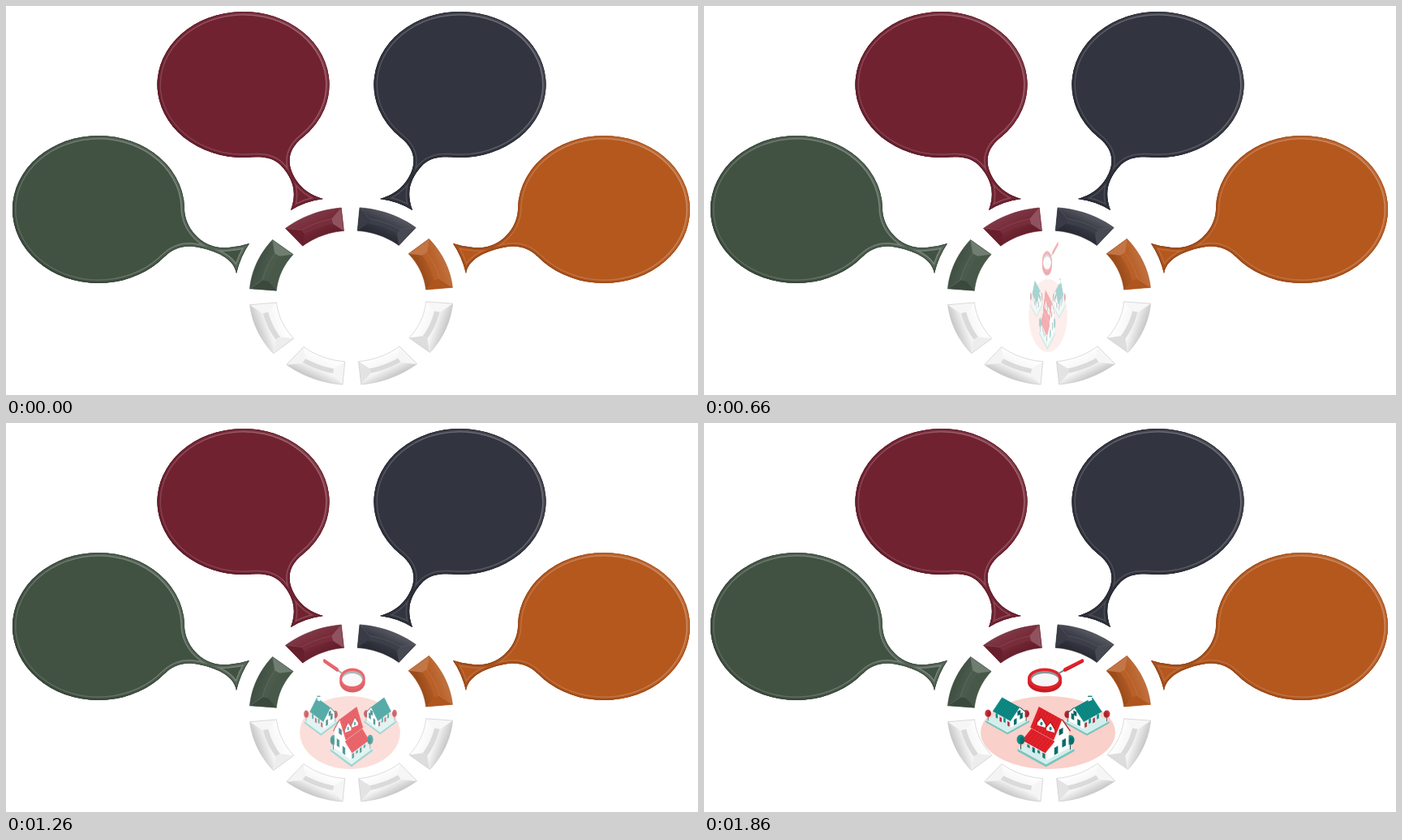
An HTML page with a canvas that plays this animation: 853x480 px, repeating every 8000 ms.

```html
<!DOCTYPE html>
<html lang="en">
<head>
<meta charset="utf-8">
<title>Bubbles and houses</title>
<style>
html, body { margin: 0; width: 100%; height: 100%; overflow: hidden; background: #fff; }
canvas { display: block; width: 853px; height: 480px; }
</style>
</head>
<body>
<canvas id="stage" width="853" height="480"></canvas>
<script>
const W = 853, H = 480, LOOP = 8000, STEP = 60, SPIN = 1818, AXIS = 424;
const RED = '#e3212a', TEAL = '#0d8a85', MINT = '#d3efeb', WALL = '#fdfdfd', GREY = '#dfe7e9';
const stage = document.getElementById('stage').getContext('2d');

function layer(scale) {
  const c = document.createElement('canvas');
  c.width = W * scale;
  c.height = H * scale;
  const g = c.getContext('2d');
  g.scale(scale, scale);
  g.lineJoin = 'round';
  return g;
}

// Lighten (k > 0) or darken (k < 0) a hex colour.
function mix(hex, k) {
  const part = i => {
    const n = parseInt(hex.slice(i, i + 2), 16);
    return Math.round(n + ((k > 0 ? 255 : 0) - n) * Math.abs(k));
  };
  return `rgb(${part(1)},${part(3)},${part(5)})`;
}

function trace(g, pts) {
  g.beginPath();
  for (const p of pts) g.lineTo(...p);
}

function poly(g, color, ...pts) {
  trace(g, pts);
  g.closePath();
  g.fillStyle = color;
  g.fill();
}

function line(g, color, width, ...pts) {
  trace(g, pts);
  g.strokeStyle = color;
  g.lineWidth = width;
  g.stroke();
}

function oval(g, color, x, y, rx, ry) {
  g.beginPath();
  g.ellipse(x, y, rx, ry, 0, 0, 7);
  g.fillStyle = color;
  g.fill();
}

// ---- speech bubbles ----
function highBubble() {
  const p = new Path2D();
  p.ellipse(292.5, 97, 106, 90, 0, 1.45, Math.PI * 2 + 0.81);
  p.bezierCurveTo(351, 174, 347, 186, 351, 201);
  p.bezierCurveTo(356, 217, 369, 232, 391, 238);
  p.quadraticCurveTo(368, 241, 351, 252);
  p.bezierCurveTo(360, 228, 352, 212, 341, 199);
  p.bezierCurveTo(331, 187, 318, 186, 305, 186.4);
  return p;
}

function lowBubble() {
  const p = new Path2D();
  p.ellipse(114, 251, 106, 91, 0, 0.69, Math.PI * 2 - 0.03);
  p.bezierCurveTo(219, 273, 242, 302, 275, 298);
  p.quadraticCurveTo(288, 297, 300, 293);
  p.quadraticCurveTo(289, 309, 284, 330);
  p.bezierCurveTo(281, 309, 251, 299, 228, 296.5);
  p.bezierCurveTo(214, 296, 204, 301, 196, 309);
  return p;
}

function drawBubble(g, shape, color, cx, cy, mirror) {
  const path = new Path2D();
  path.addPath(shape, mirror ? new DOMMatrix([-1, 0, 0, 1, mirror, 0]) : new DOMMatrix());
  const x = mirror ? mirror - cx : cx;
  const sheen = (from, to) => {
    const s = g.createLinearGradient(x - 75, cy + 65, x + 75, cy - 65);
    s.addColorStop(0, mix(color, from));
    s.addColorStop(0.5, mix(color, (from + to) / 2));
    s.addColorStop(1, mix(color, to));
    return s;
  };
  g.save();
  g.clip(path);
  g.fillStyle = color;
  g.fill(path);
  for (const [width, from, to] of [[9, 0.12, 0.3], [6, -0.08, 0.12], [2, -0.2, -0.05]]) {
    g.strokeStyle = sheen(from, to);
    g.lineWidth = width;
    g.stroke(path);
  }
  g.restore();
}

// ---- ring of eight bevelled pieces ----
// u runs along a piece, v from its outer to its inner rim.
function drawPiece(g, color, mid) {
  const half = 17.3 * Math.PI / 180;
  const at = (u, v) => {
    const a = mid + (u * 2 - 1) * half;
    return [425.5 + (125.5 - 33 * v) * Math.cos(a), 358 + (109.5 - 28.5 * v) * Math.sin(a)];
  };
  const arc = (from, to, v) => Array.from({ length: 13 }, (_, i) => at(from + (to - from) * i / 12, v));
  const light = a => 0.18 * Math.cos(a + 1);
  const white = color === '#f4f4f5';
  const tint = k => mix(color, white && k < 0 ? k * 0.9 : k);
  const shade = g.createLinearGradient(...at(0.5, 0), ...at(0.5, 1));
  shade.addColorStop(0, tint(white ? -0.2 : light(mid)));
  shade.addColorStop(0.45, tint(0.04));
  shade.addColorStop(1, tint(white ? 0.8 : -light(mid)));
  const outline = [...arc(0, 1, 0), ...arc(1, 0, 1)];
  poly(g, shade, ...outline);
  for (const [end, edge, turn] of [[0, 0.2, -1], [1, 0.8, 1]]) {
    poly(g, tint(0.07 + light(mid + turn * Math.PI / 2)), at(end, 0), at(edge, 0.42), at(edge, 0.63), at(end, 1));
    line(g, tint(0.2), 0.6, at(end, 0), at(edge, 0.42));
  }
  poly(g, tint(white ? -0.12 : 0.05), ...arc(0.2, 0.8, 0.42), ...arc(0.8, 0.2, 0.63));
  line(g, tint(0.22), 0.6, ...arc(0.2, 0.8, 0.42));
  line(g, tint(white ? -0.22 : -0.08), 0.6, ...outline, at(0, 0));
}

function drawBackdrop(g) {
  g.fillStyle = '#fff';
  g.fillRect(0, 0, W, H);
  const colors = ['#415243', '#712231', '#32343f', '#b5581e'];
  drawBubble(g, lowBubble(), colors[0], 114, 251, 0);
  drawBubble(g, highBubble(), colors[1], 292.5, 97, 0);
  drawBubble(g, highBubble(), colors[2], 292.5, 97, 852);
  drawBubble(g, lowBubble(), colors[3], 114, 251, 851);
  for (let i = 0; i < 8; i++) drawPiece(g, colors[i] || '#f4f4f5', (202.1 + 45 * i) * Math.PI / 180);
}

// ---- houses ----
// Isometric house on a square tile: u goes down right, v down left, z up.
function drawHouse(g, x, y, size, o) {
  const P = (u, v, z) => [17.5 * (u - v), 9.7 * (u + v) - z];
  const back = -0.85, ridge = -0.32, front = o.porch ? 0.2 : 0.45;
  const roof = mix(o.roof, -0.25);
  const frontPane = (color, u, v, z, w, h) =>
    poly(g, color, P(u, v, z), P(u + w, v, z), P(u + w, v, z + h), P(u, v, z + h));
  const sidePane = (color, v, z, w, h) =>
    poly(g, color, P(0.75, v, z), P(0.75, v + w, z), P(0.75, v + w, z + h), P(0.75, v, z + h));
  const slope = (v0, z0, v1, z1) => {
    poly(g, o.roof, P(-0.82, v0, z0), P(0.82, v0, z0), P(0.82, v1, z1), P(-0.82, v1, z1));
    for (let u = -0.6; u < 0.8; u += 0.2) line(g, roof, 0.5, P(u, v0, z0), P(u, v1, z1));
  };
  const tree = (u, v) => {
    const [tx, ty] = P(u, v, 0);
    line(g, '#3b4a4d', 1, [tx, ty], [tx, ty - 10]);
    oval(g, o.tree, tx, ty - 12, 5, 6);
    oval(g, mix(o.tree, -0.2), tx + 1.5, ty - 11, 3, 4.5);
  };

  g.save();
  g.translate(x, y);
  g.scale(o.flip ? -size : size, size);
  poly(g, '#79c4be', P(-1, 1, 0), P(1, -1, 0), P(1, -1, -3), P(1, 1, -3), P(-1, 1, -3));
  poly(g, MINT, P(-1, -1, 0), P(1, -1, 0), P(1, 1, 0), P(-1, 1, 0));
  tree(0.92, -0.8);

  frontPane(GREY, -0.75, front, 0, 1.5, o.eave);
  poly(g, WALL, P(0.75, back, 0), P(0.75, front, 0), P(0.75, front, o.eave), P(0.75, ridge, o.top), P(0.75, back, o.eave));
  for (const v of [-0.65, -0.1]) sidePane(mix(TEAL, -0.2), v, v < -0.5 ? 5 : 1, 0.26, 9);
  sidePane(mix(TEAL, -0.3), -0.45, o.eave, 0.28, 7);
  slope(ridge, o.top, front + 0.08, o.eave - 1);
  line(g, roof, 1.2, P(0.82, back - 0.05, o.eave - 1), P(0.82, ridge, o.top));

  if (o.porch) {
    for (const u of [-0.32, 0.32]) {
      const [dx, dy] = P(u, 0, 30);
      poly(g, WALL, [dx - 5, dy], [dx, dy - 5], [dx + 5, dy + 3], [dx + 5, dy + 7], [dx - 5, dy + 4]);
      line(g, roof, 1.1, [dx - 6, dy + 1], [dx, dy - 6], [dx + 6, dy + 4]);
      oval(g, TEAL, dx, dy + 2, 1.5, 2.2);
    }
    frontPane(GREY, -0.75, 0.7, 0, 1.5, 12);
    sidePane(WALL, front, 0, 0.5, 13);
  }
  const face = o.porch ? 0.7 : front;
  for (let i = 0; i < 4; i++) frontPane(i % 2 ? mix(o.tree, -0.15) : TEAL, -0.62 + i * 0.36, face, i % 2 ? 0.5 : 3, 0.18, 7);
  if (o.porch) {
    slope(front, 19, 0.87, 11);
    line(g, WALL, 0.8, P(-0.82, 0.87, 10.5), P(0.82, 0.87, 10.5));
  }
  if (o.chimney) {
    const [px, py] = P(-0.6, ridge, o.top);
    poly(g, WALL, [px - 3, py - 4], [px + 3, py - 4], [px + 3, py + 4], [px - 3, py + 2]);
    line(g, roof, 1.5, [px - 3.5, py - 4], [px + 3.5, py - 4]);
  }
  tree(-0.85, 0.92);
  g.restore();
}

function drawMagnifier(g) {
  for (let i = 0; i < 5; i++) line(g, '#f1f1f1', 0.8, [405 + i * 8, 292], [409 + i * 6, 300]);
  for (let y = 320; y >= 315; y--) oval(g, mix(RED, y > 316 ? -0.12 : 0), 420, y, 21, 12.5);
  oval(g, '#8e9598', 420, 315.5, 17.5, 9.5);
  oval(g, '#f6f7f7', 420.5, 317, 16.5, 8);
  line(g, '#7d8588', 2, [437, 309], [445, 304.5]);
  g.lineCap = 'round';
  line(g, mix(RED, -0.2), 4, [445, 304.8], [466, 294]);
  line(g, RED, 3.5, [445, 303.8], [466.5, 293]);
  g.lineCap = 'butt';
}

function drawScene(g) {
  oval(g, '#f9d0ca', AXIS, 382, 83, 45);
  const side = { roof: TEAL, tree: '#c9303a', eave: 13, top: 26 };
  drawHouse(g, 374, 367, 0.77, side);
  drawHouse(g, 472, 368, 0.79, { ...side, flip: true, chimney: true });
  drawHouse(g, 421.5, 402, 1, { roof: RED, tree: TEAL, eave: 22, top: 41, porch: true });
  drawMagnifier(g);
}

const back = layer(1), scene = layer(2);
drawBackdrop(back);
drawScene(scene);

// The scene swings around an upright axis while it fades in.
function draw(now) {
  const t = Math.floor((now % LOOP) / STEP) * STEP;
  const k = Math.min(1, t / SPIN);
  stage.drawImage(back.canvas, 0, 0);
  if (k > 0) {
    stage.save();
    stage.globalAlpha = k;
    stage.imageSmoothingQuality = 'high';
    stage.translate(AXIS, 0);
    stage.scale(Math.sin(2.5 * Math.PI * k), 1);
    stage.drawImage(scene.canvas, -AXIS, 0, W, H);
    stage.restore();
  }
}

const start = performance.now();
function tick() {
  draw(performance.now() - start);
  requestAnimationFrame(tick);
}
tick();
</script>
</body>
</html>
```
